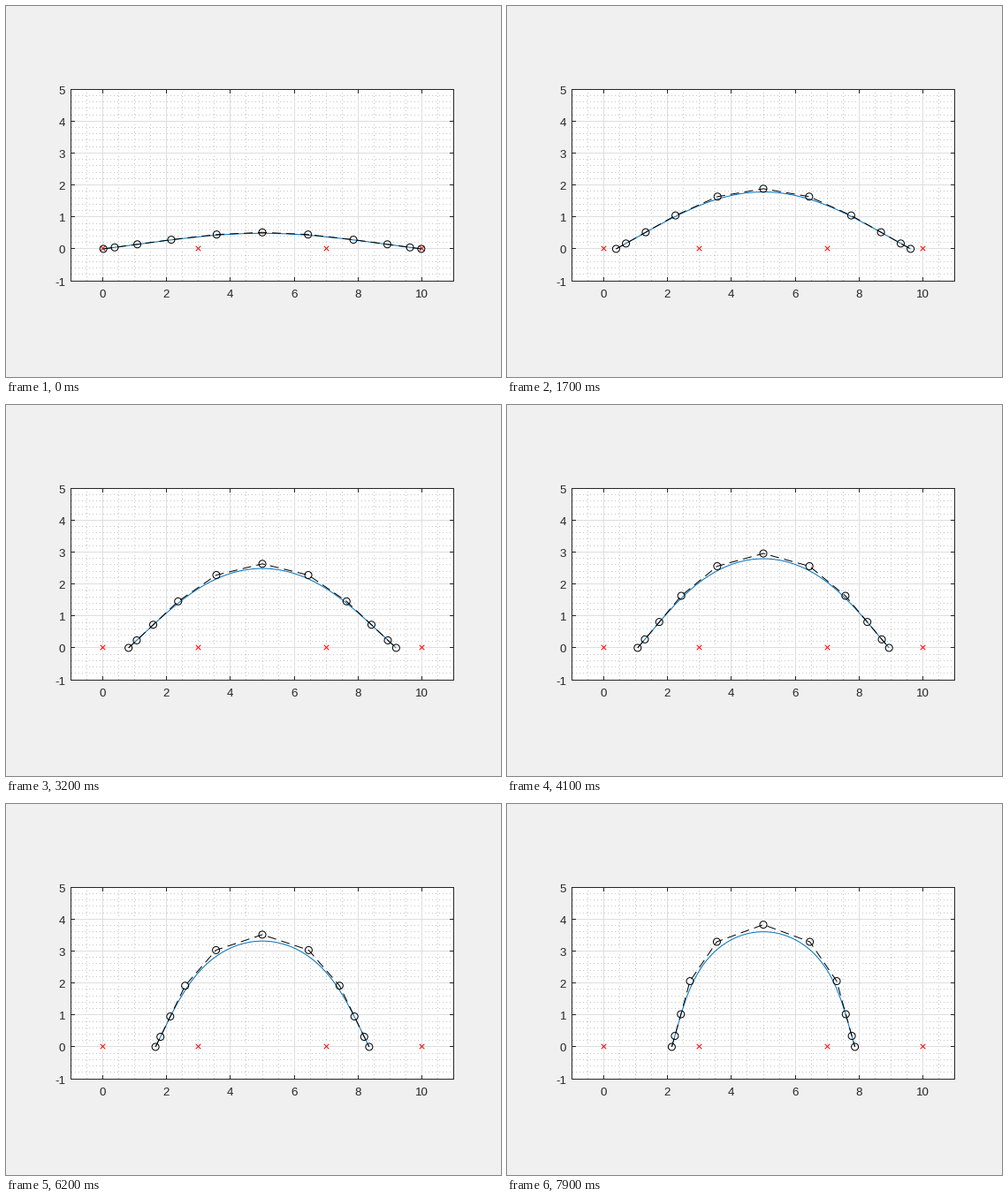
These frames come from a looping animation (560x420 px, 8000 ms). A matplotlib script:

```python
import numpy as np
import matplotlib.pyplot as plt
from matplotlib.animation import FuncAnimation
from matplotlib.patches import Circle

W, H, DPI = 560, 420, 100
PX = 72 / DPI                      # one pixel in points
LEFT, RIGHT, TOP, BOTTOM = 73.5, 506.5, 94.5, 311.5
UNIT = 434 / 12
INK = "#262626"
DEGREE, COUNT = 4, 11

plt.rcParams["font.family"] = "Liberation Sans"


def to_x(v):
    return 290 + UNIT * (np.asarray(v, float) - 5)


def to_y(v):
    return 274.95 - UNIT * np.asarray(v, float)


def pixel(v):
    """Centre of the pixel that holds v."""
    return np.floor(v) + 0.5


def basis(samples):
    """Clamped uniform B-spline basis, one row per sample."""
    spans = COUNT - DEGREE
    knots = np.concatenate([np.zeros(DEGREE), np.arange(spans + 1), np.full(DEGREE, spans)])
    t = np.linspace(0, spans - 1e-9, samples)[:, None]
    n = ((t >= knots[:-1]) & (t < knots[1:])).astype(float)
    for d in range(1, DEGREE + 1):
        m = n.shape[1] - 1
        nxt = np.zeros((samples, m))
        for i in range(m):
            a = knots[i + d] - knots[i]
            b = knots[i + d + 1] - knots[i + 1]
            if a > 0:
                nxt[:, i] += (t[:, 0] - knots[i]) / a * n[:, i]
            if b > 0:
                nxt[:, i] += (knots[i + d + 1] - t[:, 0]) / b * n[:, i + 1]
        n = nxt
    return n


def control_points(e):
    """Control polygon of the arch whose ends have moved inwards by e."""
    rest = 10 / 7 * np.array([0, 0.25, 0.75, 1.5, 2.5, 3.5])
    shift = e * np.array([1, 0.878, 0.632, 0.28 - 0.008 * e, -0.0122, 0])
    apex = np.sqrt(e * (9.5 - 1.24 * e))
    rise = apex * np.array([0, 0.0895, 0.277 - 0.0022 * e**2,
                            0.556 - 0.004 * e**2, 0.871 - 0.0053 * e, 1])
    x = rest + shift
    return np.append(x, 10 - x[-2::-1]), np.append(rise, rise[-2::-1])


fig = plt.figure(figsize=(W / DPI, H / DPI), dpi=DPI, facecolor="#f0f0f0")
ax = fig.add_axes([0, 0, 1, 1])
ax.set_xlim(0, W)
ax.set_ylim(H, 0)
ax.axis("off")


def line(xs, ys, color, z=1, **kw):
    # Coordinates already sit on pixel centres, so snapping would shift them.
    return ax.plot(xs, ys, color=color, lw=PX, zorder=z, snap=False,
                   solid_capstyle="butt", dash_capstyle="butt", **kw)[0]


def vline(v, color, **kw):
    x = pixel(to_x(v))
    line([x, x], [BOTTOM - 0.5, TOP + 0.5], color, **kw)


def hline(v, color, **kw):
    y = pixel(to_y(v))
    line([LEFT + 0.5, RIGHT - 0.5], [y, y], color, **kw)


ax.fill([LEFT, RIGHT, RIGHT, LEFT], [TOP, TOP, BOTTOM, BOTTOM], "w",
        lw=0, zorder=0, snap=False)

# Grid
dots = dict(ls=(0, (1, 3)))
for v in np.arange(-0.5, 11, 0.5):
    if v % 2:
        vline(v, "#c6c6c6", **dots)
for j in range(-4, 25):
    if j % 5:
        hline(j / 5, "#c6c6c6", **dots)
for v in range(0, 11, 2):
    vline(v, "#dedede", z=2)
for v in range(0, 5):
    hline(v, "#dedede", z=2)

# Frame, ticks and labels
line([LEFT, RIGHT, RIGHT, LEFT, LEFT], [TOP, TOP, BOTTOM, BOTTOM, TOP], INK, z=3,
     solid_joinstyle="miter")
TICK = 4.5
font = dict(fontsize=40 / 3 * PX, color=INK, va="baseline")
for v in range(0, 11, 2):
    x = pixel(to_x(v))
    line([x, x], [TOP, TOP + TICK], INK, z=3)
    line([x, x], [BOTTOM, BOTTOM - TICK], INK, z=3)
    ax.text(x - 0.5, 330, str(v), ha="center", **font)
for v in range(-1, 6):
    y = pixel(to_y(v))
    line([LEFT, LEFT + TICK], [y, y], INK, z=3)
    line([RIGHT, RIGHT - TICK], [y, y], INK, z=3)
    ax.text(67.2, y + 5.5, str(v), ha="right", **font)

# Fixed crosses
ARM = 2.8
for v in (0, 3, 7, 10):
    x, y = pixel(to_x(v)), pixel(to_y(0))
    for s in (-ARM, ARM):
        line([x - ARM, x + ARM], [y - s, y + s], "r", z=5)

# Moving arch
curve = line([], [], "#0072bd", z=4)
polygon = line([], [], "k", z=6, ls=(0, (10, 6)))
rings = [ax.add_patch(Circle((0, 0), 4, fill=False, ec="k", lw=PX, zorder=7))
         for _ in range(COUNT)]
BASIS = basis(141)


def update(i):
    step = max(0, i - 4)
    x, y = control_points(0.0281 * (step + 1))
    px, py = to_x(x), to_y(y)
    polygon.set_data(px, py)
    curve.set_data(BASIS @ px, BASIS @ py)
    for ring, center in zip(rings, zip(px, py)):
        ring.center = center
    return curve, polygon, *rings


anim = FuncAnimation(fig, update, frames=80, interval=100, repeat=True,
                     repeat_delay=0, blit=False)
plt.show()
```
